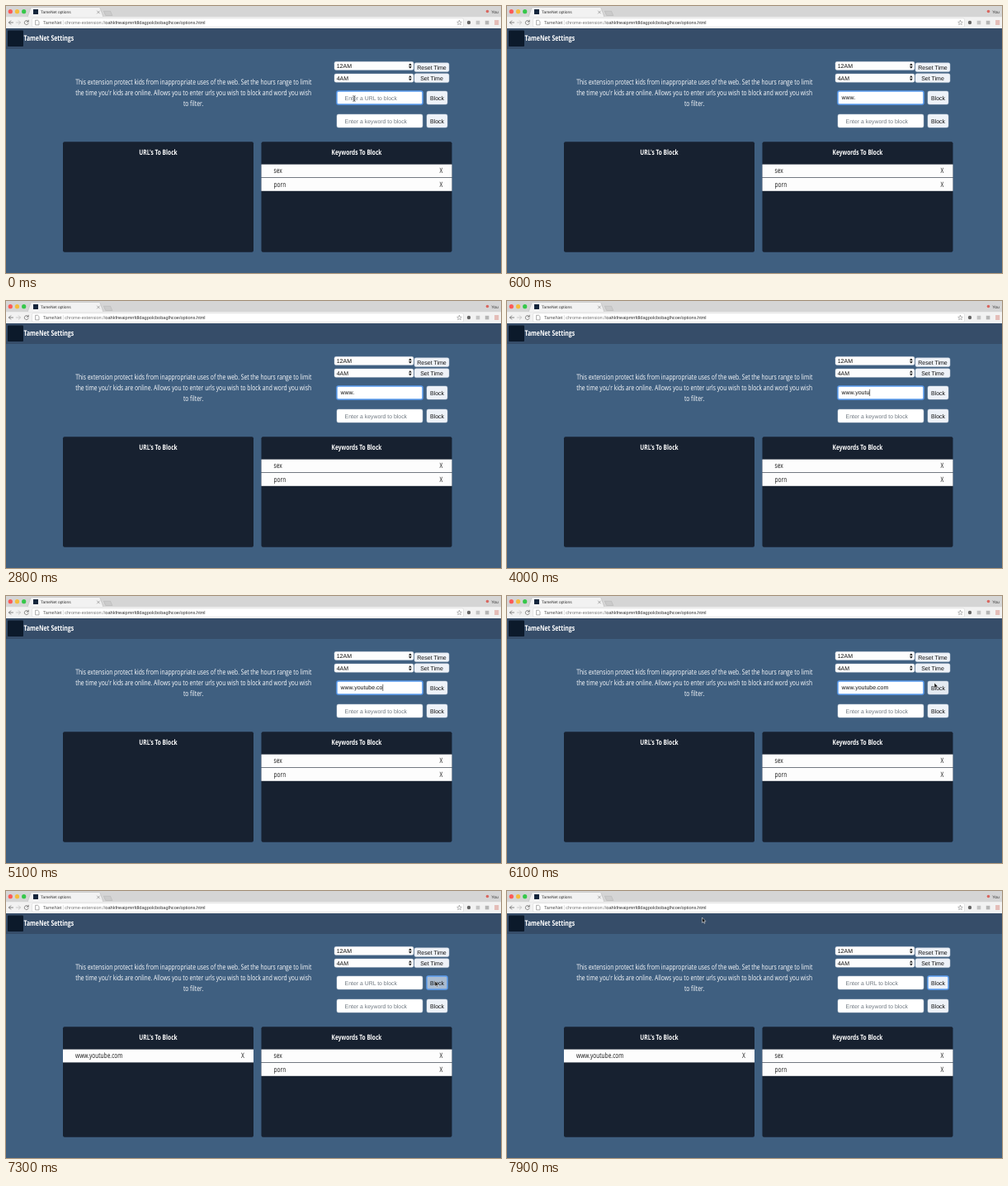
An HTML page for the animation above (8000 ms loop, 600 by 323 pixels).

```html
<!DOCTYPE html>
<html lang="en">
<head>
<meta charset="utf-8">
<title>Extension settings</title>
<style>
  html, body { margin: 0; width: 100%; height: 100%; overflow: hidden; background: #3f5f80; }
  svg { display: block; width: 600px; height: 323px; }
  text { font: 7px "Liberation Sans", Arial, sans-serif; text-rendering: geometricPrecision; }
  .narrow { font: 8.8px "Open Sans", "Noto Sans", sans-serif; }
  .bold { font-weight: 700; }
  .mid { text-anchor: middle; }
  .line { fill: none; stroke-linecap: round; stroke-linejoin: round; }
</style>
</head>
<body>
<svg id="stage" viewBox="0 0 600 323"></svg>
<script>
const LOOP = 8000;
const stage = document.getElementById('stage');

const rect = (x, y, w, h, fill, r = 0, extra = '') =>
  `<rect x="${x}" y="${y}" width="${w}" height="${h}" rx="${r}" fill="${fill}" ${extra}/>`;
const dot = (x, y, r, fill) => `<circle cx="${x}" cy="${y}" r="${r}" fill="${fill}"/>`;
const line = (d, color, width = 0.8) =>
  `<path class="line" d="${d}" stroke="${color}" stroke-width="${width}"/>`;
const text = (x, y, s, fill = '#111', size = 7, extra = '') =>
  `<text x="${x}" y="${y}" fill="${fill}" style="font-size:${size}px" ${extra}>${s}</text>`;
// Condensed face, one ratio for the whole page
const narrow = (x, y, s, fill, cls = '', size = 8.8) =>
  `<text class="narrow ${cls}" transform="translate(${x} ${y}) scale(.75 1)" fill="${fill}" style="font-size:${size}px">${s}</text>`;

const row = (x, y, label) =>
  rect(x, y, 231, 15.8, '#fdfdfd') + narrow(x + 15, y + 10.8, label, '#111') +
  narrow(x + 216, y + 10.8, 'X', '#111', '');
const panel = (x, title) =>
  rect(x, 164.3, 231, 133.5, '#172130', 2) + narrow(x + 115.5, 180, title, '#fff', 'bold mid');
const select = (y, value) =>
  rect(398, y, 96, 10.3, '#fdfdfd', 2, 'stroke="#c3ccd6" stroke-width=".4"') +
  text(400.7, y + 7.7, value) +
  `<path d="M488 ${y + 4.6}l1.9-2.7 1.9 2.7zM488 ${y + 5.7}l1.9 2.7 1.9-2.7z" fill="#222"/>`;
const button = (x, y, w, h, label, id = '') =>
  rect(x, y, w, h, '#eef2f8', 2, `id="${id}" stroke="#c9d3df" stroke-width=".5"`) +
  text(x + w / 2, y + h / 2 + 2.5, label, '#111', 7, 'class="mid"');
const field = (y, hint, id) =>
  rect(401, y, 104, 16, '#fff', 2, `id="${id}" stroke="#c5ced8" stroke-width=".5"`) +
  text(410.6, y + 10.5, hint, '#6f7880', 6.9, `id="${id}Hint"`);

const browser =
  rect(0, 0, 600, 27, '#d5d5d5') +
  `<path d="M26 13.5l4-11q.5-1 1.5-1h81q1 0 1.5 1l4 11z" fill="#f2f2f2" stroke="#b4b4b4" stroke-width=".5"/>` +
  `<path d="M118.5 6.2h8l2.3 5.3h-8z" fill="#cbcbcb" stroke="#b0b0b0" stroke-width=".5"/>` +
  rect(0, 13.2, 600, 13.8, '#f2f2f2') +
  dot(5.3, 6.7, 2.6, '#fc5b57') + dot(13.5, 6.7, 2.6, '#f5bd3b') + dot(21.7, 6.7, 2.6, '#35c84a') +
  rect(33, 4, 6, 6, '#14263c') + text(42, 9.2, 'TameNet options', '#333', 4.9) +
  line('M110.5 6l3 3m0-3l-3 3', '#777', 0.6) +
  dot(583.5, 6.5, 1.8, '#d9675f') + text(588.3, 8.6, 'You', '#333', 5) +
  line('M8.5 20h-5m2.2-2.2L3.5 20l2.2 2.2', '#666') +
  line('M12.5 20h5m-2.2-2.2l2.2 2.2-2.2 2.2', '#bbb') +
  line('M27 18.8a2.5 2.5 0 1 0 .2 2.2M27.2 17.2v1.9h-1.9', '#666') +
  rect(31.5, 14.8, 523, 10.6, '#fff', 1.5, 'stroke="#d0d0d0" stroke-width=".5"') +
  line('M36 17.3h2.6l1.4 1.4v4.2h-4z', '#777', 0.6) +
  text(45, 22, 'TameNet', '#555', 5.6) + line('M69.3 17.6v5', '#bbb', 0.5) +
  text(71.2, 22, '<tspan fill="#777">chrome-extension://</tspan>oahkfneaipmnfdldagpolcbobaglhcoe/options.html', '#333', 5.6) +
  line('M549.5 17.4l.8 1.8 2 .2-1.5 1.3.5 2-1.8-1-1.8 1 .5-2-1.5-1.3 2-.2z', '#777', 0.5) +
  dot(561, 20, 2.2, '#666') + rect(569.7, 17.8, 4.6, 4.6, '#c4c4c4') +
  rect(580.8, 17.8, 4.6, 4.6, '#b5b5b5') +
  [18, 20, 22].map(y => line(`M592.5 ${y}h4.4`, '#cf6a5e', 0.8)).join('');

const page =
  rect(0, 27, 600, 296, '#3f5f80') + rect(0, 27, 600, 25, '#364d69') +
  rect(2, 29.5, 19, 19.5, '#0c1a2b', 1) +
  narrow(21.5, 42.4, 'TameNet Settings', '#fff', 'bold', 9.2) +
  ['This extension protect kids from inappropriate uses of the web. Set the hours range to limit',
   "the time you'r kids are online. Allows you to enter urls you wish to block and word you wish",
   'to filter.'].map((s, i) => narrow(227.2, 95.3 + i * 12.6, s, '#fff', 'mid', 9)).join('') +
  select(67.3, '12AM') + select(82, '4AM') +
  button(495, 68.8, 42, 10.8, 'Reset Time') + button(495, 81.8, 42, 10.8, 'Set Time') +
  field(103, 'Enter a URL to block', 'url') + button(510, 103, 25, 16, 'Block', 'block') +
  field(131, 'Enter a keyword to block', 'word') + button(510, 131, 25, 16, 'Block') +
  panel(69, "URL's To Block") + panel(309.5, 'Keywords To Block') +
  row(309.5, 191.6, 'sex') + row(309.5, 208, 'porn') +
  `<g id="added">${row(69, 191.6, 'www.youtube.com')}</g>`;

stage.innerHTML = browser + page +
  text(405.5, 113.3, '', '#111', 7, 'id="typed"') +
  '<path id="caret" class="line" stroke="#111" stroke-width=".6"/>' +
  `<g id="beam">${line('M-1.2 -3.3q1.2 0 1.2 .8v5q0 .8-1.2 .8M1.2-3.3Q0-3.3 0-2.5M0 2.5q0 .8 1.2 .8', '#222', 0.7)}</g>` +
  '<path id="arrow" d="M0 0v6.4l1.5-1.4 1 2.3 1-.4-1-2.2h2z" fill="#111" stroke="#fff" stroke-width=".5"/>';

const el = id => document.getElementById(id);
const [url, urlHint, block, added, typed, caret, beam, arrow] =
  ['url', 'urlHint', 'block', 'added', 'typed', 'caret', 'beam', 'arrow'].map(el);

const ADDRESS = 'www.youtube.com';
const keyTimes = [100, 200, 200, 300, 3600, 3700, 3800, 3900, 4000, 4100, 4200, 4700, 5000, 5100, 5200];
const caretOff = [[600, 1100], [1800, 2300], [2800, 3600], [5700, 6200]];
const CLICK = 6500, LISTED = 6900;
const mousePath = [[5700, 422, 112], [6100, 518, 105], [6400, 520, 109], [7400, 520, 109], [7850, 236.5, 32]];

const show = (node, on) => node.setAttribute('visibility', on ? 'visible' : 'hidden');
const paint = (node, stroke, width) => {
  node.setAttribute('stroke', stroke);
  node.setAttribute('stroke-width', width);
};

function mouseAt(t) {
  const next = mousePath.findIndex(p => p[0] > t);
  if (next === 0) return mousePath[0].slice(1);
  if (next < 0) return mousePath[mousePath.length - 1].slice(1);
  const [t0, x0, y0] = mousePath[next - 1], [t1, x1, y1] = mousePath[next];
  const u = (t - t0) / (t1 - t0), k = u * u * (3 - 2 * u);
  return [x0 + (x1 - x0) * k, y0 + (y1 - y0) * k];
}

function draw(t) {
  const focused = t < CLICK;
  const count = focused ? keyTimes.filter(k => k <= t).length : 0;
  typed.textContent = ADDRESS.slice(0, count);
  show(urlHint, !count);
  paint(url, focused ? '#5b9df0' : '#c5ced8', focused ? 1.5 : 0.5);

  const x = 405.8 + (count ? typed.getComputedTextLength() : 0);
  caret.setAttribute('d', `M${x} 107.2v7.4`);
  show(caret, focused && count && !caretOff.some(([a, b]) => t >= a && t < b));

  const [mx, my] = mouseAt(t);
  const moving = t < 100 || t >= 5700;
  const overField = mx > 401 && mx < 505 && my > 103 && my < 119;
  const overButton = mx > 510 && mx < 535 && my > 103 && my < 119;
  beam.setAttribute('transform', `translate(${mx} ${my})`);
  arrow.setAttribute('transform', `translate(${mx} ${my})`);
  show(beam, moving && overField);
  show(arrow, moving && !overField);

  const pressed = t >= CLICK && t < LISTED, active = t >= LISTED;
  block.setAttribute('fill', pressed ? '#92a7be' : overButton ? (active ? '#a9bbd0' : '#e4eaf1') : '#eef2f8');
  paint(block, active ? '#5b9df0' : pressed ? '#6f88a4' : '#c9d3df', active ? 1.4 : 0.5);
  show(added, active);
}

function tick() {
  draw(performance.now() % LOOP);
  requestAnimationFrame(tick);
}
tick();
</script>
</body>
</html>
```
